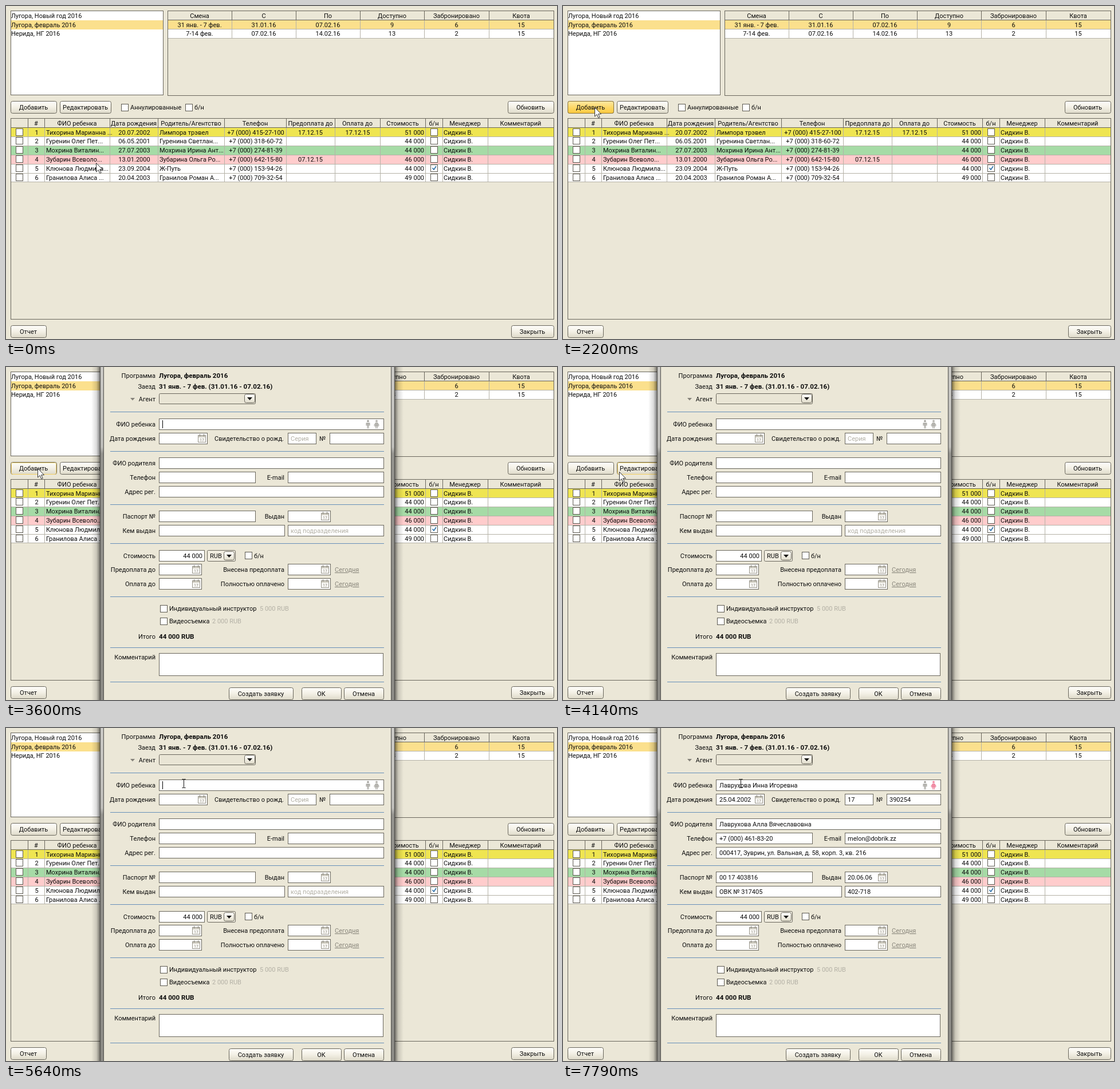
These frames come from a looping animation (962x582 px, 8000 ms). An HTML page:

```html
<!DOCTYPE html>
<html lang="ru">
<head>
<meta charset="utf-8">
<title>Заявки</title>
<style>
  html, body { margin: 0; width: 100%; height: 100%; overflow: hidden; background: #ebe7d7; }
  svg { display: block; width: 100%; height: 100%; }
  text { font: 11px Roboto, "Noto Sans", sans-serif; fill: #0c0c0c; white-space: pre; }
  .bold { font-weight: 700; font-size: 11.6px; }
  .hint { fill: #b3b0a5; }
  .link { fill: #8a877c; text-decoration: underline; }
  .mid { text-anchor: middle; }
  .end { text-anchor: end; }
  rect, .line { shape-rendering: crispEdges; }
  .round { shape-rendering: auto; }
</style>
</head>
<body>
<svg id="stage" viewBox="0 0 962 582">
  <defs>
    <linearGradient id="face" x2="0" y2="1">
      <stop stop-color="#fffefb"/><stop offset=".5" stop-color="#f3f0e5"/><stop offset="1" stop-color="#dedac9"/>
    </linearGradient>
    <linearGradient id="gold" x2="0" y2="1">
      <stop stop-color="#fde9a4"/><stop offset=".5" stop-color="#fdd868"/><stop offset="1" stop-color="#fbc93f"/>
    </linearGradient>
    <linearGradient id="shade">
      <stop stop-color="#000" stop-opacity="0"/><stop offset=".6" stop-color="#000" stop-opacity=".14"/>
      <stop offset="1" stop-color="#000" stop-opacity=".5"/>
    </linearGradient>
    <linearGradient id="glass" x2="0" y2="1">
      <stop stop-color="#c9c8c4"/><stop offset=".24" stop-color="#bcbbb7"/>
      <stop offset=".26" stop-color="#93928d"/><stop offset="1" stop-color="#8b8a85"/>
    </linearGradient>
  </defs>
</svg>
<script>
const BG = '#ebe7d7', EDGE = '#69665c', GRID = '#b5b2a7', SELECTED = '#fbe08d';
const stage = document.getElementById('stage');

const text = (x, y, s, cls = '') => `<text x="${x}" y="${y}" class="${cls}">${s}</text>`;
const fill = (x1, y1, x2, y2, color) =>
  `<rect x="${x1}" y="${y1}" width="${x2 - x1}" height="${y2 - y1}" fill="${color}"/>`;
const box = (x1, y1, x2, y2, color = '#fff', stroke = EDGE, r = 0) =>
  `<rect x="${x1 + .5}" y="${y1 + .5}" width="${x2 - x1}" height="${y2 - y1}" fill="${color}" stroke="${stroke}"` +
  (r ? ` rx="${r}" class="round"/>` : '/>');
const hline = (x1, x2, y, color) => fill(x1, y, x2, y + 1, color);
const vline = (x, y1, y2, color) => fill(x, y1, x + 1, y2, color);
const path = (d, color, extra = '') => `<path d="${d}" fill="${color}" ${extra}/>`;
const group = (id, body) => `<g id="${id}">${body}</g>`;

const button = (x1, y1, x2, y2, s) =>
  box(x1, y1, x2, y2, 'url(#face)', EDGE, 3) + text((x1 + x2) / 2, y1 + 15, s, 'mid');
const hover = (x1, x2) => box(x1 + 1, 167, x2 - 1, 187, 'none', '#f3cf62', 2);
const check = (x, y, on) => box(x, y, x + 12, y + 12, '#fff', '#5d5a51') +
  (on ? path(`M${x + 3.5} ${y + 6}l2.5 3l4-6`, 'none', 'stroke="#2b6ea8" stroke-width="1.6"') : '');
const arrowBox = (x, y) => box(x, y, x + 18, y + 15, 'url(#face)', EDGE, 3) +
  path(`M${x + 5} ${y + 6}h9l-4.5 5z`, '#111');
const calendar = (x, y) => box(x, y + 2, x + 13, y + 14, '#fbfaf6', '#98958b') +
  fill(x + 1, y + 3, x + 13, y + 6, '#d0cdc2') +
  vline(x + 3, y, y + 4, '#827f75') + vline(x + 10, y, y + 4, '#827f75') +
  `<text x="${x + 7}" y="${y + 13}" class="mid" style="font-size:7px;fill:#85827a">17</text>`;

function main() {
  let s = fill(0, 0, 962, 582, BG);
  s += box(8, 8, 274, 155) + fill(9, 25, 274, 41, SELECTED);
  ['Лугора, Новый год 2016', 'Лугора, февраль 2016', 'Нерида, НГ 2016']
    .forEach((name, i) => s += text(9, [21, 37, 52][i], name));

  const cuts = [282, 394, 506, 618, 730, 843, 956];
  s += box(282, 8, 956, 156, BG) + fill(283, 25, 956, 40, SELECTED) + fill(283, 41, 956, 56, '#fff');
  cuts.slice(1, -1).forEach(x => s += vline(x, 9, 25, EDGE) + vline(x, 25, 56, GRID));
  s += hline(283, 956, 24, EDGE) + hline(283, 956, 40, GRID) + hline(283, 956, 56, GRID);
  ['Смена|С|По|Доступно|Забронировано|Квота',
   '31 янв. - 7 фев.|31.01.16|07.02.16|9|6|15',
   '7-14 фев.|07.02.16|14.02.16|13|2|15'].forEach((row, r) =>
    row.split('|').forEach((v, i) => s += text((cuts[i] + cuts[i + 1]) / 2, [21, 37, 52][r], v, 'mid')));

  s += button(8, 166, 88, 187, 'Добавить') + button(94, 166, 183, 187, 'Редактировать') +
    check(201, 171) + text(217, 181, 'Аннулированные') + check(313, 171) + text(329, 181, 'б/н') +
    button(876, 166, 956, 187, 'Обновить') +
    button(8, 558, 70, 579, 'Отчет') + button(882, 558, 956, 579, 'Закрыть');
  return s + bookings();
}

function bookings() {
  const cuts = [8, 38, 67, 181, 265, 381, 489, 574, 653, 732, 762, 841, 956];
  const heads = '|#|ФИО ребенка|Дата рождения|Родитель/Агентство|Телефон|Предоплата до|Оплата до|Стоимость|б/н|Менеджер|Комментарий';
  const rows = [
    'Тихорина Марианна ...|20.07.2002|Лимпора трэвел|+7 (000) 415-27-100|17.12.15|17.12.15|51 000',
    'Гуренин Олег Пет...|06.05.2001|Гуренина Светлан...|+7 (000) 318-60-72|||44 000',
    'Мохрина Виталин...|27.07.2003|Мохрина Ирина Ант...|+7 (000) 274-81-39|||44 000',
    'Зубарин Всеволо...|13.01.2000|Зубарина Ольга Ро...|+7 (000) 642-15-80|07.12.15||46 000',
    'Клюнова Людмила...|23.09.2004|Ж-Путь|+7 (000) 153-94-26|||44 000',
    'Гранилова Алиса ...|20.04.2003|Гранилов Роман А...|+7 (000) 709-32-54|||49 000'];
  const colors = ['#efe551', '#fff', '#a6dba6', '#fff', '#ffcccc', '#fff'];
  [colors[3], colors[4]] = [colors[4], colors[3]];
  const top = i => Math.round(212.3 + 15.85 * i);
  let s = box(8, 196, 956, 547, BG);
  rows.forEach((row, i) => {
    s += fill(9, top(i) + 1, 956, top(i + 1), colors[i]) + hline(9, 956, top(i + 1), GRID);
  });
  cuts.slice(1, -1).forEach(x => s += vline(x, 197, 213, EDGE) + vline(x, 213, 307, GRID));
  s += hline(9, 956, 212, EDGE);
  heads.split('|').forEach((h, i) => s += text((cuts[i] + cuts[i + 1]) / 2, 209, h, 'mid'));
  rows.forEach((row, i) => {
    const y = Math.round(224.5 + 15.85 * i), [kid, born, parent, phone, pre, pay, cost] = row.split('|');
    s += check(17, y - 11) + text(53.5, y, i + 1, 'mid') + text(70, y, kid) + text(224, y, born, 'mid') +
      text(268, y, parent) + text(436, y, phone, 'mid') + text(531.5, y, pre, 'mid') +
      text(614, y, pay, 'mid') + text(730, y, cost, 'end') + check(741, y - 11, i === 4) +
      text(764, y, 'Сидкин В.');
  });
  return s;
}

function dialog() {
  const label = (y, s, x = 261) => text(x, y, s, 'end');
  const field = (x1, y, x2) => box(x1, y, x2, y + 19);
  const dateField = (x1, y, x2) => field(x1, y, x2) + calendar(x2 - 16, y + 2);
  let s = fill(149, 0, 164, 582, 'url(#shade)') +
    `<g transform="matrix(-1 0 0 1 843 0)">${fill(149, 0, 164, 582, 'url(#shade)')}</g>` +
    fill(164, 0, 679, 582, '#4a4946') + fill(165, 0, 678, 582, 'url(#glass)') +
    fill(170, 0, 673, 582, '#4f4e4a') + fill(171, 0, 672, 582, BG);
  [78, 147, 240, 308, 401, 490, 550].forEach(y => s += hline(182, 660, y, '#668fb9'));

  s += label(19, 'Программа') + text(267, 19, 'Лугора, февраль 2016', 'bold') +
    label(38, 'Заезд') + text(267, 38, '31 янв. - 7 фев. (31.01.16 - 07.02.16)', 'bold') +
    path('M217 54h8l-4 4.5z', '#85827a') + label(60, 'Агент') +
    box(267, 46, 435, 64, '#e9e5d5', EDGE, 2) + arrowBox(416, 47);

  s += label(104, 'ФИО ребенка') + field(267, 90, 659) +
    label(129, 'Дата рождения') + dateField(267, 115, 351) +
    label(129, 'Свидетельство о рожд.', 485) + field(492, 115, 541) + text(547, 129, '№') + field(565, 115, 659) +
    label(172, 'ФИО родителя') + field(267, 158, 659) +
    label(197, 'Телефон') + field(267, 183, 435) + label(197, 'E-mail', 486) + field(492, 183, 659) +
    label(222, 'Адрес рег.') + field(267, 208, 659) +
    label(265, 'Паспорт №') + field(267, 251, 435) + label(265, 'Выдан', 486) + dateField(492, 251, 566) +
    label(290, 'Кем выдан') + field(267, 276, 486) + field(492, 276, 659);

  s += label(334, 'Стоимость') + field(267, 320, 346) + text(343, 334, '44 000', 'end') +
    box(351, 320, 400, 339, '#f0ecdf', EDGE, 2) + text(356, 334, 'RUB') + arrowBox(380, 322) +
    check(417, 323) + text(433, 334, 'б/н');
  [['Предоплата до', 'Внесена предоплата'], ['Оплата до', 'Полностью оплачено']].forEach(([a, b], i) => {
    const y = 344 + 25 * i;
    s += label(y + 14, a) + dateField(267, y, 341) + label(y + 14, b, 486) + dateField(492, y, 566) +
      text(574, y + 14, 'Сегодня', 'link');
  });

  s += check(269, 416) + text(285, 426, 'Индивидуальный инструктор') + text(443, 426, '5 000 RUB', 'hint') +
    check(269, 438) + text(285, 448, 'Видеосъемка') + text(360, 448, '2 000 RUB', 'hint') +
    label(475, 'Итого') + text(267, 475, '44 000 RUB', 'bold') +
    label(511, 'Комментарий') + box(267, 500, 658, 539) +
    button(389, 560, 501, 581, 'Создать заявку') + button(516, 560, 585, 581, 'OK') +
    button(590, 560, 659, 581, 'Отмена');

  const grey = '#aaa9a4';
  s += `<circle cx="632" cy="94.5" r="2" fill="${grey}"/>` +
    path('M628.5 97.5h7v5h-1.5v-3h-.5v8h-1.2v-4h-.6v4h-1.2v-8h-.5v3h-1.5z', grey) +
    `<g id="girl"><circle cx="647" cy="94.5" r="2"/>` +
    `<path d="M645 97h4l3 5-1 .7-1.6-2 1.6 3.3h-2v3.5h-1.5V104h-1v3.500h-1.500V104h-2l1.600-3.300-1.600 2-1-.7z"/></g>`;

  const entries = [
    [273, 104, 'Лаврухова Инна Игоревна'], [273, 129, '25.04.2002'], [497, 129, '17'], [570, 129, '390254'],
    [273, 172, 'Лаврухова Алла Вячеславовна'], [273, 197, '+7 (000) 461-83-20'], [497, 197, 'melon@dobrik.zz'],
    [273, 222, '000417, Зуврин, ул. Вальная, д. 58, корп. 3, кв. 216'], [273, 265, '00 17 403816'],
    [497, 265, '20.06.06'], [273, 290, 'ОВК № 317405'], [497, 290, '402-718']];
  s += group('empty', text(497, 129, 'Серия', 'hint') + text(497, 290, 'код подразделения', 'hint')) +
    group('filled', entries.map(e => text(...e)).join('')) +
    group('caret', vline(0, 93, 107, '#000'));
  return s;
}

stage.innerHTML += main() +
  group('press', box(8, 166, 88, 187, 'url(#gold)', '#8a7336', 3) + text(48, 181, 'Добавить', 'mid')) +
  group('hoverAdd', hover(8, 88)) + group('hoverEdit', hover(94, 183)) +
  group('dialog', dialog()) +
  group('pointer', path('M.5 .5V16L4.200 12.500 6.800 18.500 9.200 17.500 6.600 11.700H11.500Z', '#fff', 'stroke="#333"')) +
  group('beam', path('M-3-7.500h2.500L0-7l.5-.5H3M0-7V7M-3 7.500h2.500L0 7l.5.5H3', 'none', 'stroke="#111"'));

const $ = id => document.getElementById(id);
const show = (id, on) => $(id).style.display = on ? '' : 'none';
const between = (t, a, b) => t >= a && t < b;
const nameEnd = 274 + Math.round($('filled').firstChild.getComputedTextLength());

// time, x, y of the mouse
const moves = [
  [0, 157, 274], [590, 149, 268], [720, 129, 253], [840, 108, 237], [990, 91, 219], [1110, 76, 203],
  [1250, 65, 189], [1400, 57, 180], [1530, 55, 177], [3740, 60, 179], [3870, 70, 181], [3990, 85, 183],
  [4140, 98, 183], [4260, 140, 172], [4410, 148, 169], [4690, 159, 169], [4830, 210, 162], [4960, 257, 148],
  [5080, 291, 138], [5230, 303.5, 121], [5380, 312.5, 116], [5520, 307.5, 101], [5640, 310.5, 97]];
const blinks = [[2350, 2780], [3320, 3740], [4260, 4830], [5230, 5800], [6230, 6660], [7220, 7790]];

function draw() {
  const t = performance.now() % 8000, typed = t >= 7220, isBeam = t >= 5230;
  const [, x, y] = moves.findLast(m => m[0] <= t);
  show('pointer', !isBeam);
  show('beam', isBeam);
  $(isBeam ? 'beam' : 'pointer').setAttribute('transform', `translate(${x} ${y})`);
  show('press', between(t, 2080, 2350));
  $('press').style.opacity = t < 2200 ? .6 : 1;
  show('hoverAdd', between(t, 1400, 2080) || between(t, 2350, 4140));
  show('hoverEdit', between(t, 4140, 4830));
  show('dialog', t >= 2350);
  show('filled', typed);
  show('empty', !typed);
  $('girl').setAttribute('fill', typed ? '#f08ca4' : '#b5b4af');
  show('caret', blinks.some(([a, b]) => between(t, a, b)));
  $('caret').setAttribute('transform', `translate(${typed ? nameEnd : 273} 0)`);
  requestAnimationFrame(draw);
}
draw();
</script>
</body>
</html>
```
